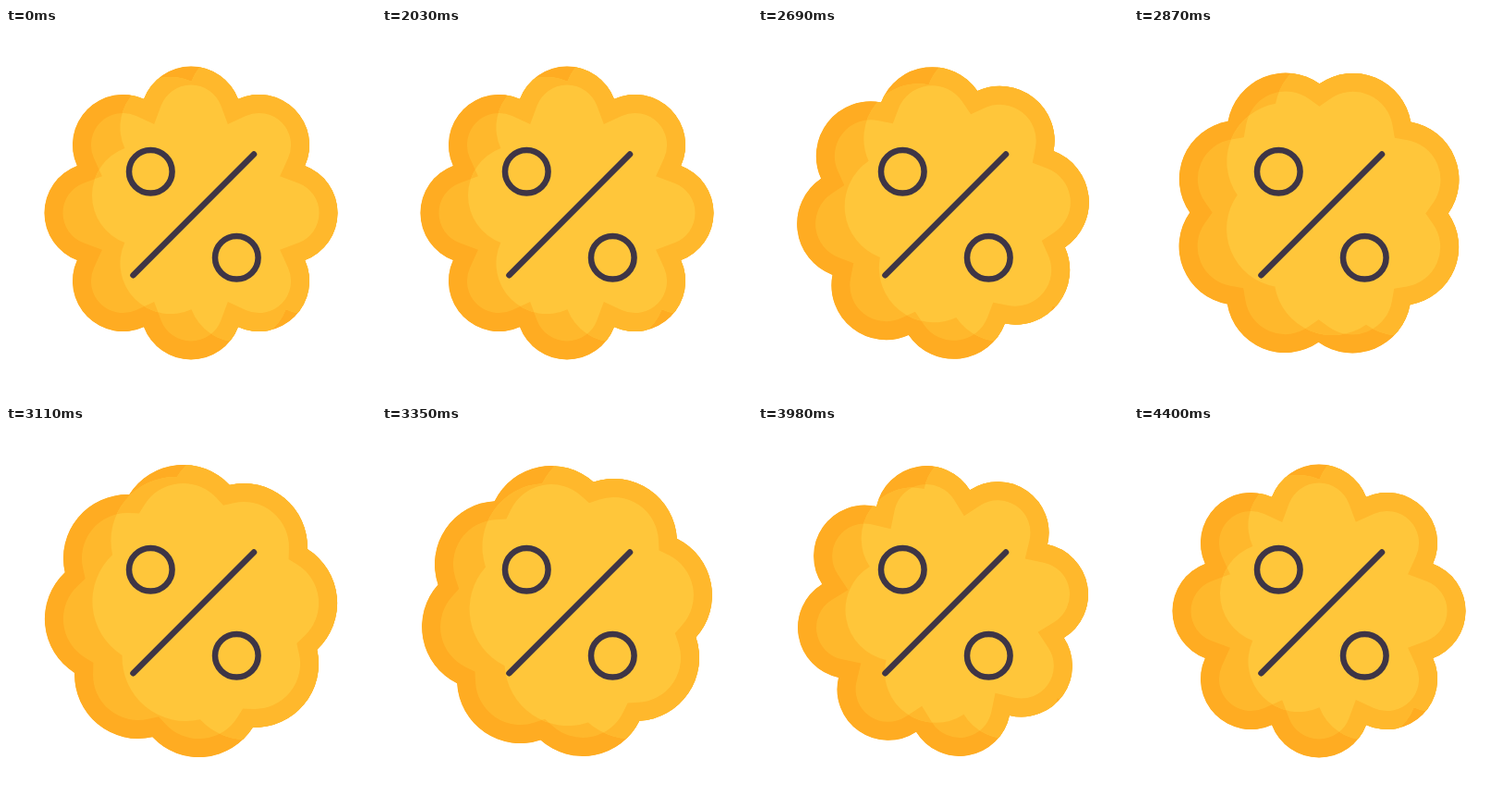
These frames come from a looping animation (400 px wide and 400 px high, 4.43 s). An HTML page:

```html
<!DOCTYPE html>
<html lang="en">
<head>
<meta charset="utf-8">
<title>Discount badge</title>
<style>
  html, body { margin: 0; width: 100%; height: 100%; overflow: hidden; background: #fff; }
  svg { display: block; width: 100%; height: 100%; }
</style>
</head>
<body>
<svg viewBox="0 0 400 400">
  <defs>
    <path id="flower" stroke-width="40" stroke-linejoin="miter"/>
    <clipPath id="badge"><use href="#flower" x="200" y="200"/></clipPath>
    <clipPath id="glow"><use href="#flower" x="251.5" y="181"/></clipPath>
  </defs>
  <g clip-path="url(#badge)">
    <use href="#flower" x="200" y="200" fill="#ffb82c" stroke="#ffac22"/>
    <g clip-path="url(#glow)">
      <use href="#flower" x="200" y="200" fill="#ffc63a" stroke="#ffb82c"/>
    </g>
  </g>
  <g fill="none" stroke="#3e3546" stroke-width="6.5" stroke-linecap="round">
    <circle cx="156.3" cy="155.3" r="23.3"/>
    <circle cx="249.3" cy="248.3" r="23.3"/>
    <path d="M137.5 267.2L268 136.5"/>
  </g>
</svg>
<script>
const LOOP = 4430, START = 2030;
const LOBES = 8, REACH = 158.5, SPREAD = 104;
const flower = document.getElementById('flower');

// time, angle, angular speed, softness of the lobes, its speed
const keys = [
  [0, 0, 0, 0, 0],
  [480, 20, 0.085, 1.6, 0.01],
  [840, 67.5, 0.21, 8.8, 0.025],
  [1320, 213.7, 0.4, 14, -0.025],
  [1650, 317, 0.165, 2.8, -0.011],
  [2400, 360, 0, 0, 0]
];

function hermite(u, span, a, va, b, vb) {
  const w = 1 - u;
  return a * (1 + 2 * u) * w * w + b * u * u * (3 - 2 * u)
    + span * u * w * (va * w - vb * u);
}

function pose(t) {
  if (t <= 0) return [0, 0];
  let i = 1;
  while (i < keys.length - 1 && t > keys[i][0]) i++;
  const a = keys[i - 1], b = keys[i], span = b[0] - a[0];
  const u = (t - a[0]) / span;
  return [1, 3].map(k => hermite(u, span, a[k], a[k + 1], b[k], b[k + 1]));
}

// Ring of equal circles, joined where neighbours cross
function outline(angle, soft) {
  const d = SPREAD - soft, r = REACH - d, half = Math.PI / LOBES;
  const notch = d * Math.cos(half) + Math.sqrt(r * r - (d * Math.sin(half)) ** 2);
  let path = '';
  for (let i = 0; i <= LOBES; i++) {
    const a = angle * Math.PI / 180 + (2 * i - 1) * half;
    const point = (notch * Math.sin(a)).toFixed(3) + ' ' + (-notch * Math.cos(a)).toFixed(3);
    path += i ? `A${r} ${r} 0 0 1 ${point}` : 'M' + point;
  }
  return path + 'Z';
}

function draw() {
  const t = performance.now() % LOOP;
  flower.setAttribute('d', outline(...pose(t - START)));
  requestAnimationFrame(draw);
}
draw();
</script>
</body>
</html>
```
